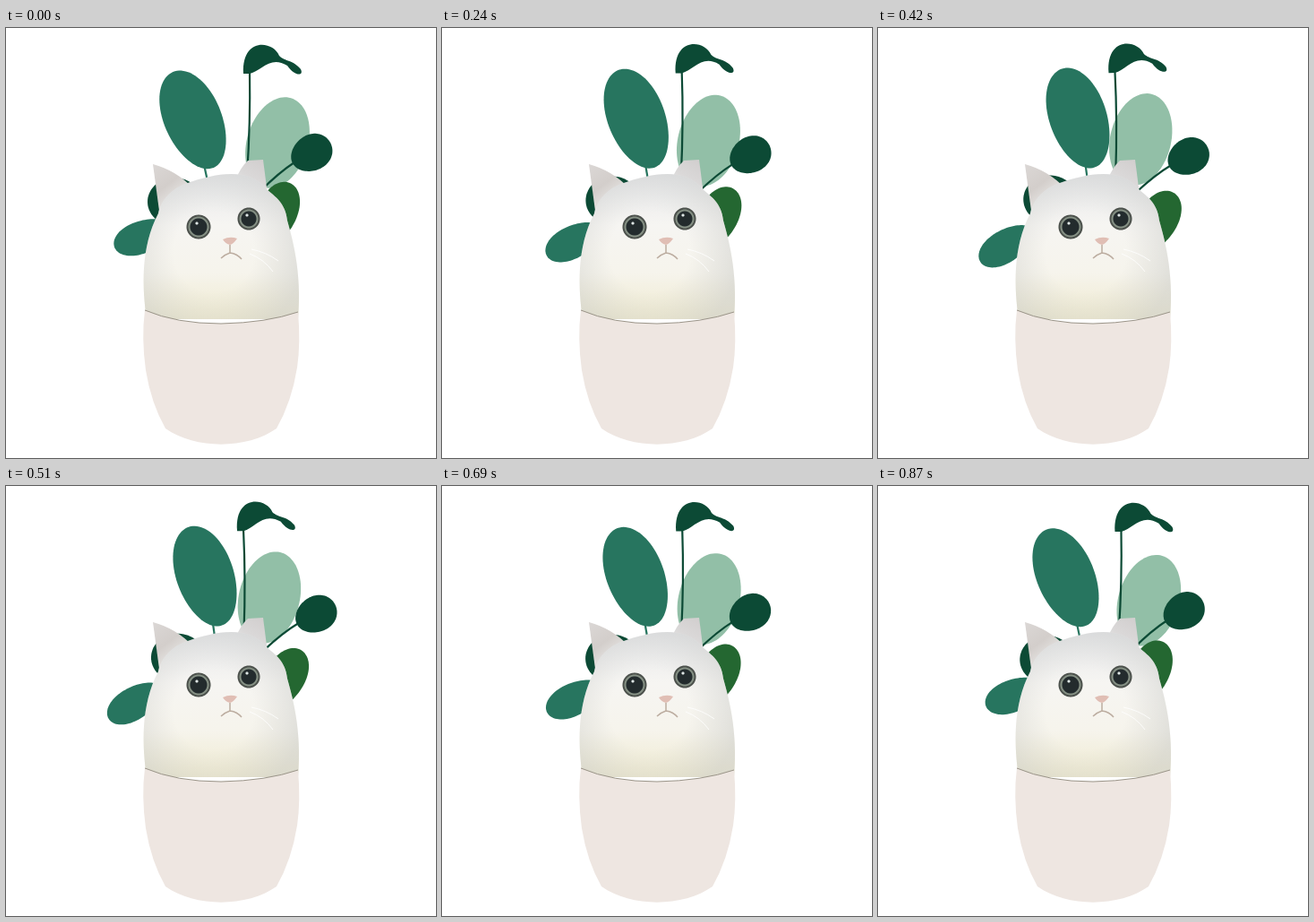
These frames come from a looping animation (480x480 px, 0.9 s). An HTML page with a canvas:

```html
<!DOCTYPE html>
<html lang="en">
<head>
<meta charset="utf-8">
<title>Potted cat</title>
<style>
  html, body { margin: 0; width: 100%; height: 100%; overflow: hidden; background: #fff; }
  canvas { display: block; width: 480px; height: 480px; }
</style>
</head>
<body>
<canvas id="stage" width="480" height="480"></canvas>
<script>
const ctx = document.getElementById('stage').getContext('2d');
const STEP = 30, HALF = 15;
const DARK = '#0c4a35', TEAL = '#27755f', LIGHT = '#92bfa7', GREEN = '#246731';
const RAD = Math.PI / 180;

// An ellipse turned by tilt degrees; taper narrows its lower end.
function oval(x, y, rx, ry, tilt, taper = 0) {
  const path = new Path2D(), cos = Math.cos(tilt * RAD), sin = Math.sin(tilt * RAD);
  for (let deg = 0; deg < 360; deg += 4) {
    const along = Math.cos(deg * RAD);
    const u = rx * Math.sin(deg * RAD) * (1 + taper * along);
    const v = -ry * along;
    path.lineTo(x + u * cos - v * sin, y + u * sin + v * cos);
  }
  path.closePath();
  return path;
}

const curled = new Path2D(`M265 51C263 10 298 14 305 31C312 38 320 35 329 46
  C333 54 322 54 314 42C295 30 285 48 272 51Z`);

// Swing is in degrees around a root, by default one hidden behind the cat.
const leaves = [
  { color: LIGHT, swing: -3.9, shape: oval(303, 128, 34, 52, 17) },
  { color: DARK, swing: -2, shape: curled, stem: new Path2D('M272 50Q273 105 269 165') },
  { color: TEAL, swing: 5, shape: oval(209, 102.5, 32, 58, -23, 0.04),
    stem: new Path2D('M220 148Q223 162 227 180') },
  { color: GREEN, swing: 8, shape: oval(302, 208, 22, 38, 23, 0.1) },
  { color: DARK, swing: 2.4, shape: oval(341, 139.5, 20, 24, 60, 0.08),
    stem: new Path2D('M322 150Q305 161 284 182') },
  { color: DARK, swing: 3, shape: oval(188, 194, 30, 27, 0) },
  { color: TEAL, swing: -13, root: [195, 285], shape: oval(153, 233, 18, 34, 70, -0.1) }
];

const body = new Path2D(`M170 207C150 245 152 290 157 325L326 325C331 270 318 230 314 215
  C312 195 300 188 291 180C270 155 235 162 200 174C183 180 172 195 170 207Z`);
const leftEar = new Path2D('M171 204L164 152Q190 159 209 179Z');
const rightEar = new Path2D('M256 170Q262 155 270 148L287 147L292 186Z');
const pot = new Path2D(`M155 315Q190 330 240 330Q291 329 326 317Q329 352 325 379
  Q319 417 302 447C270 470 212 471 178 447Q162 419 156 382Q151 346 155 315Z`);
const rim = new Path2D('M155 315Q190 330 240 330Q291 329 326 317');
const nose = new Path2D('M242 236Q250 232 258 235Q254 241 250 242Q245 241 242 236Z');
const mouth = new Path2D('M250 242V251Q244 253 240 257M250 251Q258 252 263 258');
const whiskers = new Path2D('M272 252Q288 258 298 272M274 247Q290 250 304 260');

function fill(path, color) {
  ctx.fillStyle = color;
  ctx.fill(path);
}

function stroke(path, color, width) {
  ctx.strokeStyle = color;
  ctx.lineWidth = width;
  ctx.stroke(path);
}

function shade(gradient, ...colors) {
  colors.forEach((color, i) => gradient.addColorStop(i / (colors.length - 1), color));
  return gradient;
}

function drawLeaf({ color, swing, shape, stem, root = [240, 280] }, amount) {
  const [x, y] = root;
  ctx.save();
  ctx.translate(x, y);
  ctx.rotate(swing * amount * RAD);
  ctx.translate(-x, -y);
  if (stem) stroke(stem, color, 2.2);
  fill(shape, color);
  ctx.restore();
}

function drawEye(x, y, r) {
  const disc = (radius, color) => fill(oval(x, y, radius, radius, 0), color);
  disc(r, '#4c514c');
  disc(r - 2, '#859084');
  disc(r - 4, '#232b2d');
  fill(oval(x - 2, y - 4, 1.6, 1.6, 0), '#dfe6e5');
}

function drawCat() {
  fill(leftEar, shade(ctx.createLinearGradient(165, 155, 195, 195), '#dad6d4', '#d3cecb', '#ebeae8'));
  fill(rightEar, shade(ctx.createLinearGradient(285, 148, 265, 185), '#d2cfcf', '#dad8d8', '#ebebea'));
  fill(body, shade(ctx.createLinearGradient(0, 165, 0, 328), '#e6e7e9', '#f6f5f2', '#f6f4ec', '#eee9cd'));
  fill(body, shade(ctx.createRadialGradient(232, 250, 45, 232, 250, 100), '#c8c9c700', '#c8c9c780'));
  drawEye(215, 222, 13.5);
  drawEye(271, 213, 12.5);
  fill(nose, '#e0beb4');
  stroke(mouth, '#bcada0', 1.5);
  stroke(whiskers, '#fff', 0.8);
}

function draw(now) {
  const step = Math.floor(now / STEP) % (2 * HALF);
  const amount = 1 - Math.abs(step - HALF) / HALF;
  ctx.fillStyle = '#fff';
  ctx.fillRect(0, 0, 480, 480);
  leaves.forEach(leaf => drawLeaf(leaf, amount));
  drawCat();
  fill(pot, '#eee6e1');
  stroke(rim, '#9a9488', 1);
}

const start = performance.now();
function tick() {
  draw(performance.now() - start);
  requestAnimationFrame(tick);
}
tick();
</script>
</body>
</html>
```
